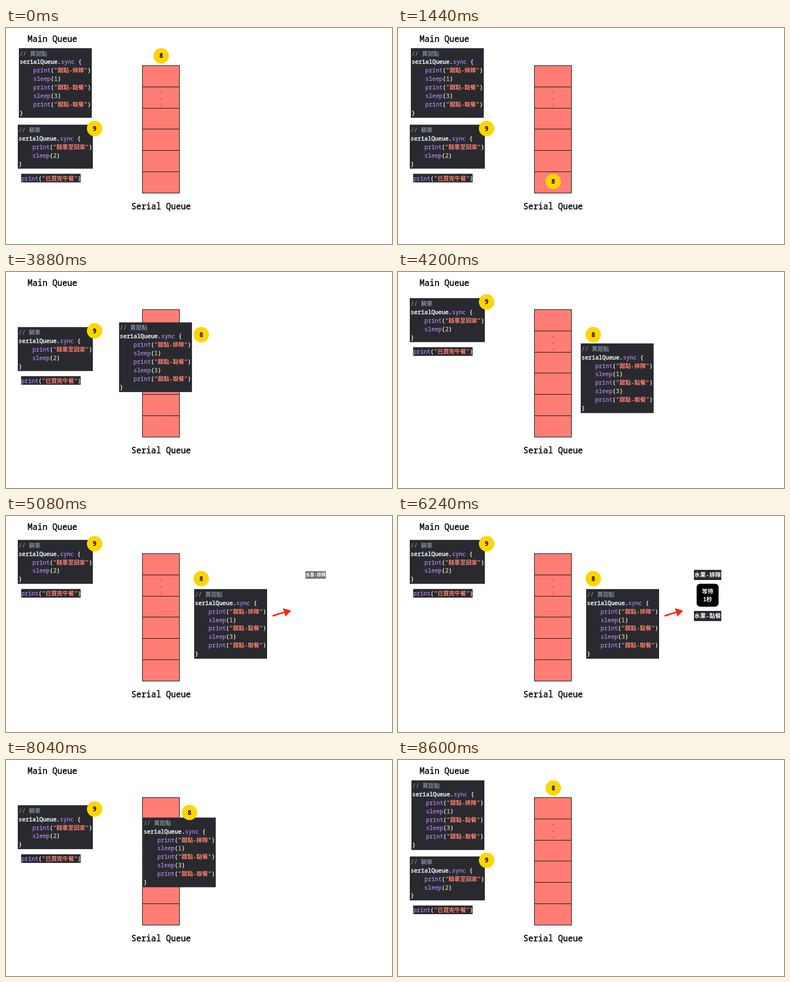
An HTML page for the animation above (8.64 s loop, 720 px wide and 405 px high).

```html
<!DOCTYPE html>
<html lang="zh-Hant">
<head>
<meta charset="utf-8">
<title>Serial queue</title>
<style>
  html, body { margin: 0; width: 100%; height: 100%; overflow: hidden; background: #fff; }
  svg { display: block; width: 720px; height: 405px; }
  text { white-space: pre; font-family: "Noto Sans Mono", "Noto Sans CJK TC", "Noto Sans CJK", monospace; }
  /* thin strokes give the in-between medium weight */
  .title { font-size: 15.45px; stroke: #000; stroke-width: 0.4px; }
  .code { font-size: 10.72px; stroke-width: 0.28px; }
  .plain { fill: #f4f4f5; stroke: #f4f4f5; }
  .name { fill: #f4f4f5; stroke: #f4f4f5; stroke-width: 0.5px; }
  .note { fill: #7f8c98; stroke: #7f8c98; }
  .call { fill: #b281eb; stroke: #b281eb; }
  .str { fill: #ff8170; font-weight: 700; }
  .num { fill: #d9c97c; stroke: #d9c97c; }
  .badge { font: 700 11.5px "Noto Sans", "Open Sans", sans-serif; text-anchor: middle; }
  .out { font-size: 10.72px; font-weight: 700; fill: #fff; text-anchor: middle; }
</style>
</head>
<body>
<svg id="stage" viewBox="0 0 720 405" xmlns="http://www.w3.org/2000/svg"></svg>
<script>
const LOOP = 8640, STEP = 40, MOVE = 960;
const DARK = '#292a30', CHAR = 6.43, LINE = 15.9;
const stage = document.getElementById('stage');

function add(parent, tag, attrs = {}, text) {
  const el = document.createElementNS('http://www.w3.org/2000/svg', tag);
  for (const k in attrs) el.setAttribute(k, attrs[k]);
  if (text !== undefined) el.textContent = text;
  parent.appendChild(el);
  return el;
}
const group = () => add(stage, 'g');
const rect = (g, x, y, width, height, fill, more) =>
  add(g, 'rect', { x, y, width, height, fill, ...more });

// Code panels with simple syntax colouring
const TOKEN = /(\/\/.*)|(".*?")|(print|sleep|sync)|(serialQueue\.)|(\d+)|([^\w"]+)/g;
const KINDS = ['note', 'str', 'call', 'name', 'num', 'plain'];
function codeLine(g, x, y, src) {
  const body = src.trimStart();
  const line = add(g, 'text', { class: 'code', x: x + (src.length - body.length) * CHAR, y });
  for (const m of body.matchAll(TOKEN)) {
    add(line, 'tspan', { class: KINDS[m.slice(1).findIndex(Boolean)] }, m[0]);
  }
}
function panel(w, h, x, y, lines) {
  const g = group();
  rect(g, 0, 0, w, h, DARK);
  lines.forEach((s, i) => codeLine(g, x, y + i * LINE, s));
  return g;
}
function badge(n) {
  const g = group();
  add(g, 'circle', { r: 14.4, fill: '#ffd500' });
  add(g, 'text', { class: 'badge', y: 4.2 }, n);
  return g;
}

// Fixed scenery
add(stage, 'text', { class: 'title', x: 40.2, y: 25.6 }, 'Main Queue');
add(stage, 'text', { class: 'title', x: 233.7, y: 339.6 }, 'Serial Queue');
const frame = { stroke: '#111', 'stroke-width': 1 };
rect(stage, 254.5, 70.5, 69, 239, '#ff7d75', frame);
for (const y of [110.5, 150.5, 189.5, 229.5, 269.5]) {
  add(stage, 'path', { d: `M254.5 ${y}h69`, ...frame });
}
for (const y of [121, 133.3, 145.6]) add(stage, 'circle', { cx: 289.5, cy: y, r: 0.75, fill: '#612' });

// Moving parts
const dessert = panel(136, 130.6, 1.4, 13.8, [
  '// 買甜點', 'serialQueue.sync {', '    print("甜點-排隊")', '    sleep(1)',
  '    print("甜點-點餐")', '    sleep(3)', '    print("甜點-取餐")', '}'
]);
const ride = panel(140, 82.4, 1.6, 14, [
  '// 騎車', 'serialQueue.sync {', '    print("騎車至回家")', '    sleep(2)', '}'
]);
const done = panel(111, 16.2, 0.2, 12.4, ['print("已買完午餐")']);
const nine = badge(9), eight = badge(8);

// Arrow, revealed from its tail
const clip = add(add(stage, 'clipPath', { id: 'reveal' }), 'rect', { x: 496, y: 168, width: 0, height: 26 });
const arrow = add(stage, 'g', { 'clip-path': 'url(#reveal)', fill: '#ff2614', stroke: '#ff2614' });
add(arrow, 'path', { d: 'M498.3 187L510 183.2L522 179.8', fill: 'none', 'stroke-width': 2.9, 'stroke-linecap': 'round' });
add(arrow, 'path', { d: 'M517.6 174.2L530.4 177.8L521.4 187.2L520.4 181Z', 'stroke-width': 1.8, 'stroke-linejoin': 'round' });

// Printed results
function label(text) {
  const g = group();
  rect(g, -25.5, -9.5, 51, 19, DARK);
  add(g, 'text', { class: 'out', y: 3.9 }, text);
  return g;
}
function wait(seconds) {
  const g = group();
  rect(g, -20.5, -21.5, 41, 43, '#000', { rx: 6.5 });
  add(g, 'text', { class: 'out', y: -3.6 }, '等待');
  add(g, 'text', { class: 'out', y: 11.4 }, seconds + '秒');
  return g;
}
const results = [
  { el: label('水果-排隊'), y: 110.5, at: 4920 },
  { el: wait(1), y: 148.5, at: 5400 },
  { el: label('水果-點餐'), y: 187.5, at: 5880 },
  { el: wait(3), y: 229.5, at: 6360 },
  { el: label('水果-取餐'), y: 271.5, at: 6840 }
];

const clamp = v => Math.min(1, Math.max(0, v));
const mix = (a, b, p) => a + (b - a) * p;

// cubic-bezier(.42, 0, .58, 1)
function ease(t) {
  if (t <= 0 || t >= 1) return clamp(t);
  let lo = 0, hi = 1, u;
  for (let i = 0; i < 24; i++) {
    u = (lo + hi) / 2;
    const x = 1.26 * u * (1 - u) ** 2 + 1.74 * u * u * (1 - u) + u ** 3;
    if (x < t) lo = u; else hi = u;
  }
  return u * u * (3 - 2 * u);
}
const moved = (t, start) => ease((t - start) / MOVE);

// Growth with a small overshoot, one value per step
const POP = [0, 0.19, 0.38, 0.57, 0.75, 0.92, 1.07, 1.157, 1.09, 1];
function popScale(ms) {
  const i = clamp(ms / 360) * 9, k = Math.min(8, Math.floor(i));
  return mix(POP[k], POP[k + 1], i - k);
}

const place = (el, x, y, s = 1) => el.setAttribute('transform', `translate(${x} ${y}) scale(${s})`);

function draw(t) {
  const back = moved(t, 7680);
  const out = moved(t, 3360) - back;
  const lift = -136.5 * out;
  place(dessert, mix(24, 351, out), mix(37.8, 137, out));
  place(ride, 22, 181.3 + lift);
  place(done, 28.2, 273.3 + lift);
  place(nine, 165.3, 188.5 + lift);

  const down = moved(t, 480), side = moved(t, 1920);
  const x = mix(289.5, 364.2, side), y = mix(mix(52.2, 287.8, down), 117.5, side);
  place(eight, mix(x, 289.5, back), mix(y, 52.2, back));

  const shown = t < 7680;
  clip.setAttribute('width', shown ? 38 * clamp((t - 4360) / 520) : 0);
  for (const r of results) {
    const ms = shown ? t - r.at : 0;
    place(r.el, 577.5, r.y, popScale(ms));
    r.el.setAttribute('opacity', clamp(ms / 248));
  }
}

const begin = performance.now();
function tick() {
  const t = (performance.now() - begin) % LOOP;
  draw(Math.floor(t / STEP) * STEP);
  requestAnimationFrame(tick);
}
tick();
</script>
</body>
</html>
```
